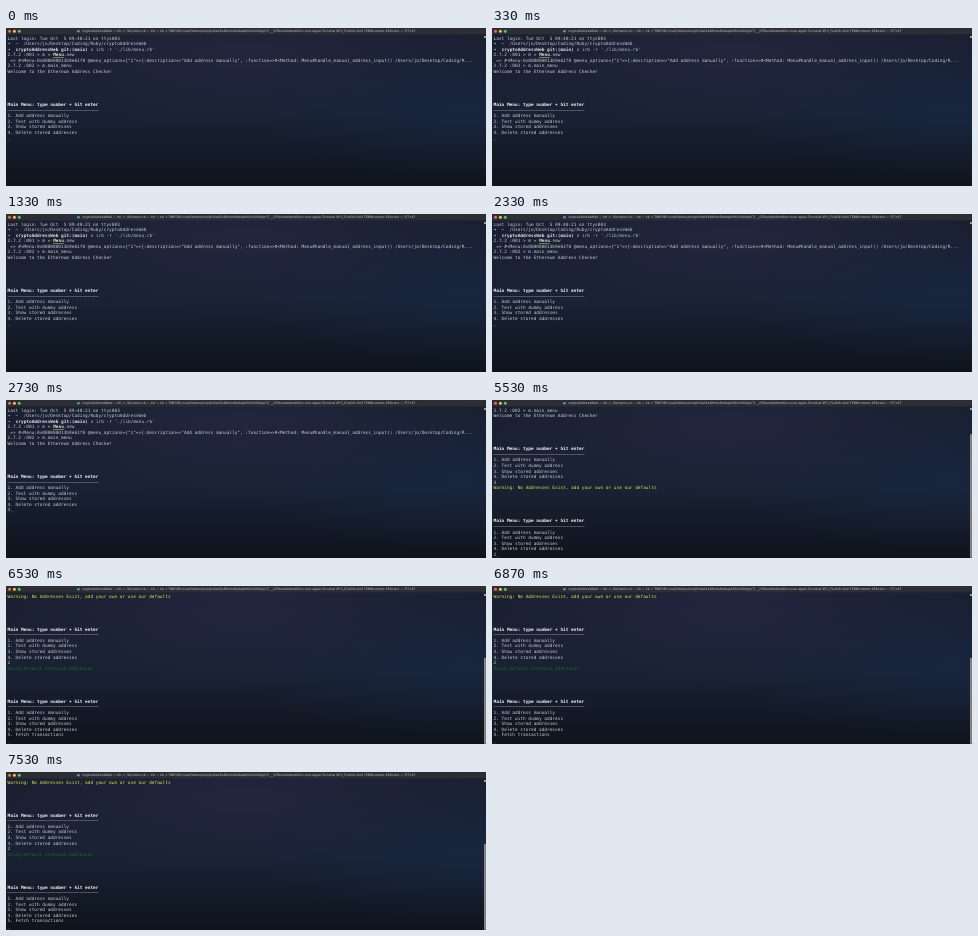
These frames come from a looping animation (480 px wide and 158 px high, 8000 ms). An HTML page:

```html
<!DOCTYPE html>
<html lang="en">
<head>
<meta charset="utf-8">
<title>Terminal menu</title>
<style>
  html, body { margin: 0; width: 100%; height: 100%; overflow: hidden; background: #141a25; }
  svg { display: block; width: 480px; height: 158px; }
  text { white-space: pre; text-rendering: geometricPrecision; }
  #rows { font: 4.45px "DejaVu Sans Mono", monospace; fill: #c6cacf; }
  #title { font: 600 3.22px Inter, "Liberation Sans", sans-serif; fill: #a3a4a7; text-anchor: middle; }
  .bold { font-weight: 700; fill: #f1f3f5; }
  .warn { fill: #dde23e; }
  .done { fill: #12701a; }
  .dir { font-weight: 700; fill: #dfe6ea; }
  .mark { fill: #d9d488; }
  .cmd { fill: #a9c7c3; }
  .const { font-weight: 700; fill: #dfe3b4; text-decoration: underline; }
</style>
</head>
<body>
<svg viewBox="0 0 480 158">
  <defs>
    <linearGradient id="sky" x1="0" y1="0" x2="0" y2="1">
      <stop offset="0" stop-color="#1a1f31"/>
      <stop offset=".55" stop-color="#192234"/>
      <stop offset="1" stop-color="#0e141d"/>
    </linearGradient>
    <radialGradient id="dusk" cx=".5" cy=".15" r=".5">
      <stop offset="0" stop-color="#272a45" stop-opacity=".6"/>
      <stop offset="1" stop-color="#272a45" stop-opacity="0"/>
    </radialGradient>
    <radialGradient id="blue" cx=".95" cy=".5" r=".45">
      <stop offset="0" stop-color="#172845" stop-opacity=".6"/>
      <stop offset="1" stop-color="#172845" stop-opacity="0"/>
    </radialGradient>
  </defs>
  <rect width="480" height="158" fill="url(#sky)"/>
  <rect width="480" height="158" fill="url(#dusk)"/>
  <rect width="480" height="158" fill="url(#blue)"/>
  <rect width="480" height="6.4" fill="#2d2e34"/>
  <circle cx="3.5" cy="3.2" r="1.5" fill="#ec6a5e"/>
  <circle cx="8.4" cy="3.2" r="1.5" fill="#f4bf4f"/>
  <circle cx="13.3" cy="3.2" r="1.5" fill="#61c554"/>
  <rect x="71" y="2.3" width="2.8" height="2" rx=".3" fill="#4b9cc4"/>
  <text id="title" x="242.8" y="4.4">cryptoAddressWeb — irb -r ./lib/menu.rb — irb — irb -r TMPDIR=/var/folders/mz/qfn3wt5s3l9cbxfkbbqk4h5c0000gn/T/ __CFBundleIdentifier=com.apple.Terminal XPC_FLAGS=0x0 TERM=xterm-256color — 177×27</text>
  <g id="rows"></g>
  <rect x="478" y="8" width="1.8" height="2" fill="#a5a6a9"/>
  <rect id="thumb" x="478" width="1.9" rx=".9" fill="#8b8884"/>
</svg>
<script>
const LOOP = 8000, ROWS = 27, PITCH = 5.545, LEFT = 1.6, BASE = 11.55;
const TRACK_TOP = 11, TRACK_END = 158;
const NS = 'http://www.w3.org/2000/svg';
const rows = document.getElementById('rows');
const thumb = document.getElementById('thumb');

// A line is a list of [text, class] spans.
const line = (text, cls = '') => [[text, cls]];
const menu = (...extra) => [
  ...Array.from({ length: 5 }, () => line('')),
  line('Main Menu: type number + hit enter', 'bold'),
  line('–'.repeat(34)),
  ...['Add address manually', 'Test with dummy address', 'Show stored addresses',
      'Delete stored addresses', ...extra].map((item, i) => line(`${i + 1}. ${item}`))
];

const start = [
  line('Last login: Tue Oct  5 09:40:21 on ttys003'),
  line('➜  ~  /Users/jo/Desktop/Coding/Ruby/cryptoAddressWeb'),
  [['➜  ', ''], ['cryptoAddressWeb git:(main) ', 'dir'], ['✗ ', 'mark'], ["irb -r './lib/menu.rb'", 'cmd']],
  [['2.7.2 :001 > m = ', ''], ['Menu', 'const'], ['.new', '']],
  line(' => #<Menu:0x000000013b9e61f0 @menu_options={"1"=>{:description=>"Add address manually", ' +
       ':function=>#<Method: Menu#handle_manual_address_input() /Users/jo/Desktop/Coding/R...'),
  line('2.7.2 :002 > m.main_menu'),
  line('Welcome to the Ethereum Address Checker'),
  ...menu()
];
const warned = [
  ...start, line('3'),
  line('Warning: No Addresses Exist, add your own or use our defaults', 'warn'),
  ...menu()
];
const loaded = [
  ...warned, line('2'),
  line('Using Default Ethereum Addresses', 'done'),
  ...menu('Fetch transactions')
];

// [start time, printed lines, typed input]
const steps = [
  [0, start, ''],
  [2730, start, '3'],
  [3330, warned, ''],
  [5530, warned, '2'],
  [6530, loaded, '']
];

function drawLine(spans, row) {
  let col = 0;
  for (const [text, cls] of spans) {
    const el = document.createElementNS(NS, 'text');
    el.setAttribute('x', LEFT + col * 2.679);
    el.setAttribute('y', BASE + row * PITCH);
    el.setAttribute('class', cls);
    el.textContent = text;
    rows.append(el);
    col += text.length;
  }
}

function draw([, printed, input]) {
  const lines = [...printed, line(input + '_')];
  rows.replaceChildren();
  lines.slice(-ROWS).forEach(drawLine);
  const size = (TRACK_END - TRACK_TOP) * Math.min(1, ROWS / lines.length);
  thumb.setAttribute('y', TRACK_END - size);
  thumb.setAttribute('height', size);
  thumb.style.display = lines.length > ROWS ? '' : 'none';
}

let shown;
function tick() {
  const t = performance.now() % LOOP;
  const step = steps.findLast(([at]) => at <= t);
  if (step !== shown) draw(shown = step);
  requestAnimationFrame(tick);
}
tick();
</script>
</body>
</html>
```
